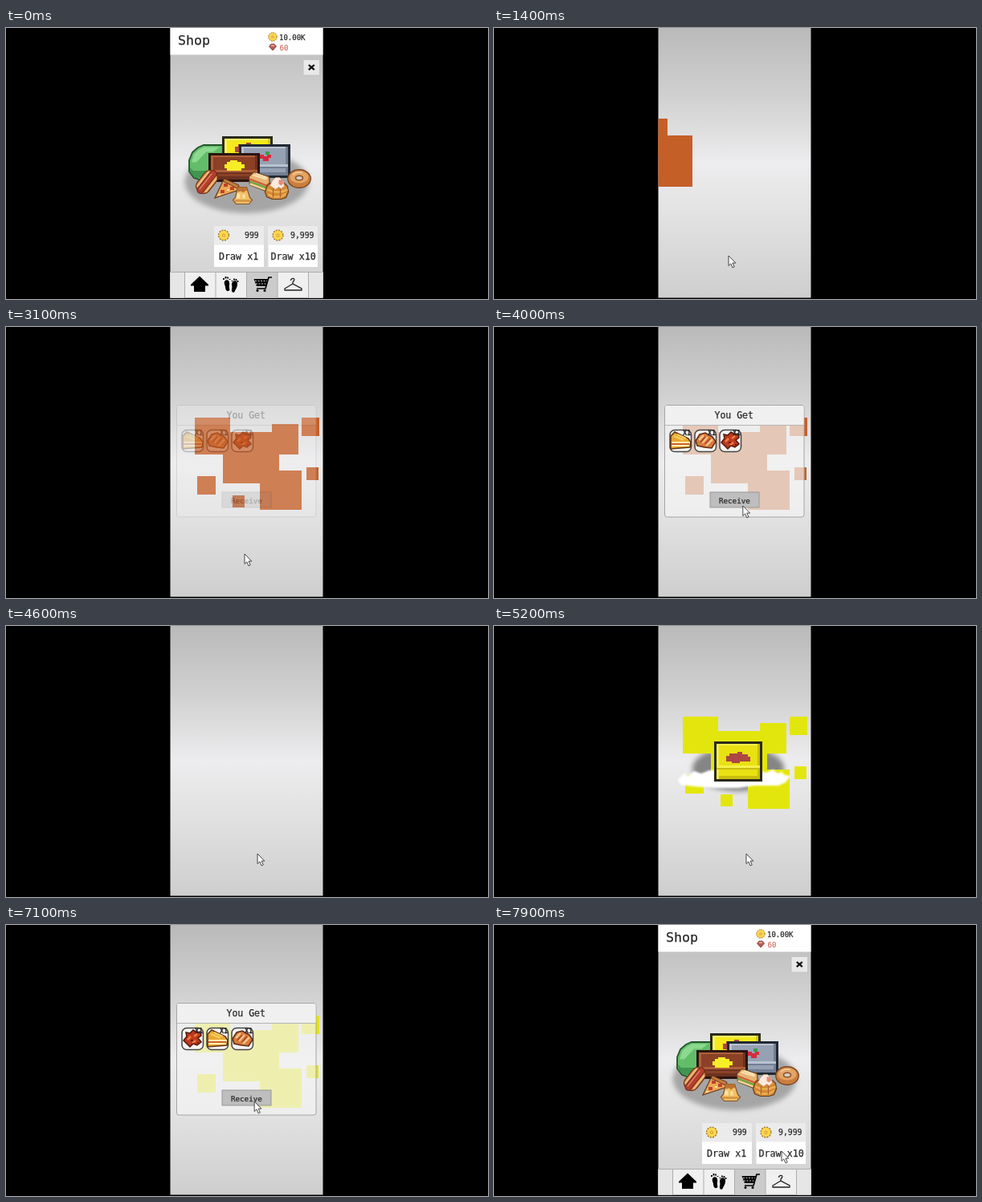
Animation, 600 px wide and 338 px high, one loop 8 s. Source, as an HTML page:

```html
<!DOCTYPE html>
<html lang="en">
<head>
<meta charset="utf-8">
<title>Shop draw</title>
<style>
html, body { margin: 0; width: 100%; height: 100%; overflow: hidden; background: #000; }
svg { display: block; width: 600px; height: 338px; }
text { font-family: "DejaVu Sans Mono", "Liberation Mono", monospace; fill: #2a2a2a; stroke: #2a2a2a; stroke-width: .25; }
.px { shape-rendering: crispEdges; }
</style>
</head>
<body>
<svg viewBox="0 0 600 338">
  <defs>
    <linearGradient id="wall" x2="0" y2="1">
      <stop offset="0" stop-color="#bababa"/>
      <stop offset=".25" stop-color="#d0d0d0"/>
      <stop offset=".5" stop-color="#edecee"/>
      <stop offset=".68" stop-color="#e3e3e3"/>
      <stop offset="1" stop-color="#cecece"/>
    </linearGradient>
    <filter id="soft" x="-20%" y="-20%" width="140%" height="140%"><feGaussianBlur stdDeviation="3"/></filter>
    <filter id="mist" x="-20%" y="-50%" width="140%" height="200%"><feGaussianBlur stdDeviation="1"/></filter>
    <filter id="lens" x="-5%" y="-5%" width="110%" height="110%"><feGaussianBlur stdDeviation=".45"/></filter>
    <clipPath id="phone"><path d="M204.500 0h190v336.600h-190z"/></clipPath>

    <g id="coin">
      <circle r="6.500" fill="#f6cf48" stroke="#8f6324" stroke-width="1.100" stroke-dasharray="2 1.400"/>
      <circle r="4.800" fill="#ffd94e"/>
      <path d="M0-3l1 2h2l-1.500 1.500 .6 2.300-2.100-1.200-2.100 1.200 .6-2.300-1.500-1.500h2z" fill="#d59c2c"/>
      <circle r="1" fill="#ffe88c"/>
    </g>
    <g id="hotdog" transform="rotate(-52)">
      <rect x="-15.500" y="-9" width="31" height="18" rx="8" fill="#d98a48" stroke="#6b351c" stroke-width="1.300"/>
      <path d="M-12-6h24M-11 6.500h22" stroke="#efbb7c" stroke-width="2.200"/>
      <rect x="-17" y="-4" width="34" height="8" rx="4" fill="#b4402b" stroke="#6d241b"/>
      <path d="M-13-1.500h25" stroke="#e0806a" stroke-width="1.500"/>
    </g>
    <g id="pizza">
      <path d="M-15 12L-5-9 15-2 12 3z" fill="#eda955" stroke="#6b351c" stroke-width="1.200"/>
      <path d="M-5-9l2-3 18 8-2 4z" fill="#c67c3c" stroke="#6b351c"/>
      <path d="M-4-6h5v4h-5zM4-2h5v4h-5zM-8 2h5v4h-5z" fill="#c1422c"/>
      <path d="M0 1h3v2h-3zM-11 7h3v2h-3z" fill="#ffe29a"/>
    </g>
    <g id="pudding">
      <path d="M-6-10h11l4 13 3 3-4 5h-16l-4-5 3-3z" fill="#f0c067" stroke="#80512a" stroke-width="1.200"/>
      <path d="M-6-10h11l1 4-3 1-2 2-3-2-3 1-2-2z" fill="#bd7433"/>
      <path d="M-7-2h4v6h-5zM0-1h3v5h-3z" fill="#ffe2a0"/><path d="M-10 7h20" stroke="#d29240" stroke-width="2.500"/>
    </g>
    <g id="sandwich">
      <path d="M-13-6l6-6 19 6 1 12-5 6-20-8z" fill="#e6b673" stroke="#6a4020" stroke-width="1.200"/>
      <path d="M-12-3l21 8 3-3" fill="none" stroke="#d0593c" stroke-width="2"/>
      <path d="M-12 0l21 8 3-3" fill="none" stroke="#75a343" stroke-width="2.500"/>
      <path d="M-12 3l19 7" stroke="#f3d898" stroke-width="2"/>
      <path d="M-8-8l17 5M-5-10l14 5" stroke="#f8deb0" stroke-width="2"/>
    </g>
    <g id="pancake">
      <path d="M-13-1l4-4h18l4 4 1 7-3 7-6 2h-11l-7-3-2-6z" fill="#d48a34" stroke="#6b3a1a" stroke-width="1.200"/>
      <path d="M-12 3l7 3h10l8-3M-11 9l6 3h10l6-4" fill="none" stroke="#edb45c" stroke-width="2"/>
      <path d="M-5 2v11M4 2v11" stroke="#a9602a" stroke-width="1.200"/>
      <path d="M-9-2l3-6 4-4h5l5 5 1 6-4 3-3-2-4 3-4-3z" fill="#fbeade" stroke="#c08a62" stroke-width=".8"/>
      <path d="M2-9h4l2 4-3 3-3-2z" fill="#e58a78"/>
    </g>
    <g id="donut">
      <ellipse rx="14.300" ry="11.300" fill="#c97e3e" stroke="#74401f" stroke-width="1.200"/>
      <ellipse cy="-2" rx="11.500" ry="7.500" fill="#e3a566"/>
      <ellipse cy="-1" rx="4.500" ry="2.800" fill="#d3ccc4" stroke="#8f5228" stroke-width="1.500"/>
      <path d="M-8-5l5-3h7" fill="none" stroke="#f3c794" stroke-width="1.800"/>
    </g>
    <g id="toast">
      <path d="M-12-6l5-5 17 8 3 5-1 6-24 2z" fill="#e9a72f" stroke="#5f3214" stroke-width="1.500"/>
      <path d="M-11 2h23M-11 6h22" stroke="#fff0b4" stroke-width="2"/><path d="M-11 4h22" stroke="#c34b26" stroke-width="1.500"/>
      <path d="M-8-6l12 5M-4-8l11 5" stroke="#f7cf62" stroke-width="2"/>
    </g>
    <g id="meat">
      <path d="M-12 0l5-8 7-2 9 5 4 6-5 8-9-1-9-2z" fill="#d87a3c" stroke="#5f2a14" stroke-width="1.500"/>
      <path d="M-8-1l6-6M-4 3l7-8M1 6l8-8" stroke="#f5c288" stroke-width="2.500"/>
      <path d="M-6 2l6-7M0 4l6-7" stroke="#a8431f" stroke-width="1.500"/>
    </g>
    <g id="wings">
      <path d="M-11 2l4-5-1-5 5 1 4-4 5 3 4-1 1 5-4 3 4 5-5 4-5-2-4 4-4-4z" fill="#bd3a1e" stroke="#4f170f" stroke-width="1.500"/>
      <path d="M-6 1l4-4M0 5l4-3M2-3l4-3" stroke="#ef7e3c" stroke-width="2.500"/>
      <path d="M-2 1h3v2h-3zM6 4h2v2h-2z" fill="#701b12"/>
    </g>
  </defs>

  <rect width="600" height="338"/>
  <g clip-path="url(#phone)">
    <rect x="204" width="192" height="337" fill="url(#wall)"/>

    <g id="shop">
      <rect x="204" width="192" height="33.400" fill="#fff"/>
      <text x="214" y="21" font-size="16.600">Shop</text>
      <use href="#coin" transform="translate(332 11) scale(.82)"/>
      <text x="340" y="14.700" font-size="9">10.00K</text>
      <path d="M327.500 23l2.500-3h4l2.500 3-4.500 5z" fill="#b75b54" stroke="#7a3a36" stroke-width=".8"/>
      <path d="M330 22h4" stroke="#f5b4ad" stroke-width="1.500"/>
      <text x="340.500" y="27.700" font-size="9" style="fill:#d8756c;stroke:#d8756c">60</text>
      <rect x="370" y="39.500" width="20.500" height="19.500" fill="#e9e9e9" stroke="#c4c4c4"/>
      <path d="M376.800 46l7 6.200m0-6.200l-7 6.200" stroke="#111" stroke-width="2.300"/>
      <ellipse cx="299.500" cy="192" rx="77" ry="39" fill="#a5a5a5" filter="url(#soft)"/>
      <g filter="url(#lens)">
        <path d="M246 146h25v44h-27l-10-3-6-8v-14l4-10 7-6z" fill="#62bd69" stroke="#24542c" stroke-width="1.800"/>
        <path d="M246 148.500h20l-8 6h-9l-12 13h-6l3-10 5-5z" fill="#8cd98f"/>
        <path d="M229 174l4 4h21v9h-18l-6-6z" fill="#409650"/>
        <g id="boxes"></g>
      </g>
      <g id="food" filter="url(#lens)"></g>
      <g id="buy"></g>
      <g id="nav">
        <rect x="204" y="304" width="192" height="33" fill="#f0f0f0"/>
        <path d="M204 304h18v33h-18zM377 304h19v33h-19z" fill="#e6e6e6"/>
        <rect x="300" y="304" width="38" height="33" fill="#cbcbcb"/>
        <path d="M204 304.500h192M222.500 304v33M261 304v33M299.500 304v33M338 304v33M376.500 304v33" stroke="#adadad"/>
        <path d="M241 309.500l11 10.500v1.500h-4v7.500h-14v-7.500h-4v-1.500z" fill="#000"/>
        <g>
          <path d="M272 316c3-4 7-1 6 4s2 7-1 8-4-3-4-5-2-4-1-7zM281 319c1-5 7-5 7 0s-2 6-3 9-5 2-4-2 0-4 0-7z"/>
          <path d="M271 314v-2M273.500 312.500v-2.500M276 312.500v-2M278.500 314v-1M281.500 316v-1M284 314.500v-2M286.500 315v-2M288.500 317v-2" stroke="#000" stroke-width="1.800"/>
        </g>
        <path d="M308.500 313h18l-2.500 9h-12z"/>
        <path d="M310 315.500h15M311 319h13" stroke="#cbcbcb" stroke-dasharray="2 1.500"/>
        <path d="M331 311h-4l-4 14h-11" fill="none" stroke="#000" stroke-width="1.700"/>
        <circle cx="313" cy="327.500" r="1.500"/><circle cx="322" cy="327.500" r="1.500"/>
        <path d="M354.500 315c0-4 6-3 4 0l-1.500 2v2l11 6v2h-21v-2l10-6" fill="none" stroke="#222" stroke-width="1.300"/>
      </g>
    </g>

    <g id="reveal">
      <ellipse id="shade" cx="304" cy="178" rx="57" ry="28" fill="#858585" filter="url(#soft)"/>
      <g id="squares" class="px"></g>
      <g id="puff" fill="#fff" filter="url(#mist)">
        <path d="M-70 2l8-8 5 3 7-6 9 3 10-4h62l9 3 8-4 6 5 5-2 4 4 7 1-6 8-9 4h-30l-20 3h-30l-25-2-17-2z"/>
      </g>
      <g id="brown"></g>
      <g id="yellow"></g>
      <g id="dialog">
        <rect x="212.500" y="97.500" width="173.500" height="139.500" rx="3" fill="#f4f4f4" fill-opacity=".7" stroke="#a5a5a5"/>
        <path d="M213 122v-22q0-2 2-2h168.500q2 0 2 2v22z" fill="#f0f0f0"/>
        <path d="M213 122.500h172.500" stroke="#b5b5b5"/>
        <text x="274.500" y="114" font-size="11.500">You Get</text>
        <g id="prizes"></g>
        <rect x="269" y="206" width="61" height="19" fill="#bebebe" stroke="#989898"/>
        <text x="280" y="219.500" font-size="9.200">Receive</text>
      </g>
    </g>
    <path id="cursor" d="M0 0v12.500l2.800-2.600 2.200 5 2.200-1-2.200-4.800h3.800z" fill="#fff" stroke="#333" stroke-width=".9"/>
  </g>
</svg>
<script>
const LOOP = 8000, AGAIN = 3250, OPEN = 1300, TAKEN = 4100, LAND = 1900, POP = 2750, SHOW = 3100;
const $ = id => document.getElementById(id);
const clamp = x => Math.min(1, Math.max(0, x));
const span = (t, a, b) => clamp((t - a) / (b - a));
const show = (el, on) => el.setAttribute('display', on ? 'inline' : 'none');
const move = (el, x, y, s = 1) => el.setAttribute('transform', `translate(${x} ${y}) scale(${s})`);

// Chest centred on 0,0
function chest(w, h, [edge, face, light, dark], label) {
  const x = -w / 2, y = -h / 2, lid = h * .66;
  const rect = (x, y, w, h, c) => `<rect x="${x}" y="${y}" width="${w}" height="${h}" fill="${c}"/>`;
  return `<g class="px">${rect(x, y, w, h, edge)}${rect(x + 3, y + 3, w - 6, h - 6, face)}` +
    rect(x + 3, y + 3, w - 6, 2, light) + rect(x + 3, y + 3, 3, h - 6, light) +
    rect(x + w - 6, y + 3, 3, h - 6, dark) +
    rect(x + 3, y + lid - 3, w - 6, 3, light) + rect(x + 3, y + lid, w - 6, 2, dark) +
    rect(x + 6, y + h - 7, w - 12, 4, dark) + label +
    `<rect class="heat" x="${x + 3}" y="${y + 3}" width="${w - 6}" height="${h - 6}" fill="#e01616" opacity="0"/></g>`;
}
const BROWN = ['#2a1511', '#8b4126', '#b0603a', '#6c3220'];
const YELLOW = ['#2a2a1c', '#e9e112', '#f6f04a', '#c9bd10'];
const GREY = ['#222933', '#97a1b4', '#b9c2d0', '#737f94'];
const plate = c => `<path d="M-12-3h3v-3h4v-2h9v2h5v3h4v5h-4v3h-18v-3h-3z" fill="${c}"/>`;
const steak = '<path d="M-15-7h4v-3h10v-2h6v3h7v3h3v6h-13v2h-10v-2h-7z" fill="#ad4744"/>';
const apple = '<path d="M-7-3h5v2h4v-2h5v4h-3v4h-7v-3h-4z" fill="#d92a3c"/><path d="M0-7h5v4h-5z" fill="#3c9c4a"/>';
const at = (x, y, s) => `<g transform="translate(${x} ${y})">${s}</g>`;

$('boxes').innerHTML =
  at(300.5, 158, chest(63, 46, ['#2a2a1c', '#f4ea1c', '#fff766', '#d8c814'], at(-1, -3, steak))) +
  at(322, 166, chest(64, 42, GREY, at(1, -5, apple))) +
  at(284, 174, chest(64, 36, BROWN, at(0, -1, plate('#f8ee26'))));
$('brown').innerHTML = chest(60, 49, BROWN, at(0, -4, plate('#f6d022')));
$('yellow').innerHTML = chest(60, 50, YELLOW, steak);

const FOOD = [['hotdog', 250, 192], ['pizza', 275, 200], ['pudding', 294.5, 208.5],
  ['sandwich', 315.5, 191.5], ['pancake', 337.5, 198.5], ['donut', 365, 188]];
$('food').innerHTML = FOOD.map(([id, x, y]) => at(x, y, `<use href="#${id}"/>`)).join('');

$('buy').innerHTML = [[259, 62, '999', 297, 'Draw x1', 265], [326.5, 61.5, '9,999', 354, 'Draw x10', 329.5]]
  .map(([x, w, cost, cx, name, nx]) =>
    `<rect x="${x}" y="247" width="${w}" height="51" fill="#fff"/>
     <rect x="${x}" y="247" width="${w}" height="23.500" fill="#ebebeb"/>
     <use href="#coin" transform="translate(${x + 12} 258.500)"/>
     <text x="${cx}" y="262.300" font-size="9.800">${cost}</text>
     <text x="${nx}" y="289" font-size="11.700">${name}</text>`).join('');

const PRIZES = [['toast', 'meat', 'wings'], ['wings', 'toast', 'meat']];
$('prizes').innerHTML = PRIZES.map(row => '<g>' + row.map((id, i) => at(232 + 31 * i, 142,
  `<rect x="-13" y="-13.500" width="26.500" height="27" rx="6" fill="#f7f5f2" stroke="#444" stroke-width="1.500"/>
   <use href="#${id}"/>
   <text x="3" y="-7" font-size="8.500" font-weight="bold">X1</text>`)).join('') + '</g>').join('');

// x, y, width, height, slide start, extra drop while sliding
const SQUARES = [
  [234.5, 113, 44.5, 45.5, 1293, 0], [270, 131, 69.5, 64, 1323, 6],
  [331, 121, 32.5, 37.5, 1395, 0], [316, 179, 52, 48.5, 1420, 0],
  [368, 113, 22, 22.5, 1430, 0], [374, 175, 14.5, 15.5, 1440, 0],
  [238, 185.5, 22.5, 23, 1400, 0], [282, 210, 14.5, 15, 1410, 0]];
$('squares').innerHTML = SQUARES.map(([x, y, w, h]) => `<rect x="${x}" y="${y}" width="${w}" height="${h}"/>`).join('');
const tiles = [...$('squares').children];

// time, x, y
const MOUSE = [[200, 318, 340], [750, 291, 284], [1400, 292, 284], [2400, 297, 283], [3100, 297, 283],
  [3700, 309, 223], [4120, 310, 223], [4480, 313, 284], [5200, 314, 284], [6300, 314, 280],
  [6550, 314, 280], [7000, 309, 220], [7380, 310, 220], [7800, 358, 282], [8000, 358, 282]];

function mouse(t) {
  let i = 0;
  while (i < MOUSE.length - 2 && MOUSE[i + 1][0] < t) i++;
  const [t0, x0, y0] = MOUSE[i], [t1, x1, y1] = MOUSE[i + 1];
  let p = span(t, t0, t1);
  p = p * p * (3 - 2 * p);
  move($('cursor'), x0 + (x1 - x0) * p, y0 + (y1 - y0) * p);
}

function draw(t) {
  const second = t >= TAKEN;
  const r = second ? t - AGAIN : t;
  const open = r >= OPEN && r < TAKEN;
  show($('shop'), !open);
  show($('reveal'), open);
  mouse(t);
  if (!open) return;

  $('squares').setAttribute('fill', second ? '#e3e60c' : '#c55f28');
  SQUARES.forEach(([, , , , start, drop], i) => {
    const left = (1 - span(r, start, start + 250)) ** 2;
    move(tiles[i], -195 * left, drop * left);
  });

  const boxOn = r >= 1720 && r < POP;
  const box = second ? $('yellow') : $('brown');
  show($('brown'), boxOn && !second);
  show($('yellow'), boxOn && second);
  show($('shade'), boxOn);
  $('shade').setAttribute('opacity', span(r, 1720, LAND));
  const fall = span(r, 1720, LAND) ** 2, heat = span(r, 2150, 2400);
  move(box, 304, -30 + 199 * fall + 2 * heat, 1 + .15 * heat);
  box.querySelector('.heat').setAttribute('opacity', .66 * heat);

  // Dust on landing, short flash when the chest opens
  const dust = r >= LAND && r < 2200, flash = r >= POP && r < 2950;
  show($('puff'), dust || flash);
  if (dust) move($('puff'), 299, 190, .85 + .15 * span(r, LAND, 1950) + .12 * span(r, 1950, 2200));
  else move($('puff'), 304, 175, 1);
  $('puff').setAttribute('opacity', dust ? 1 - span(r, 2000, 2200) : 1 - span(r, POP, 2950));

  show($('dialog'), r >= SHOW);
  $('dialog').setAttribute('opacity', .3 + .7 * span(r, SHOW, SHOW + 150));
  [...$('prizes').children].forEach((g, i) => show(g, i === +second));
}

const began = performance.now();
function tick() {
  draw((performance.now() - began) % LOOP);
  requestAnimationFrame(tick);
}
tick();
</script>
</body>
</html>
```
